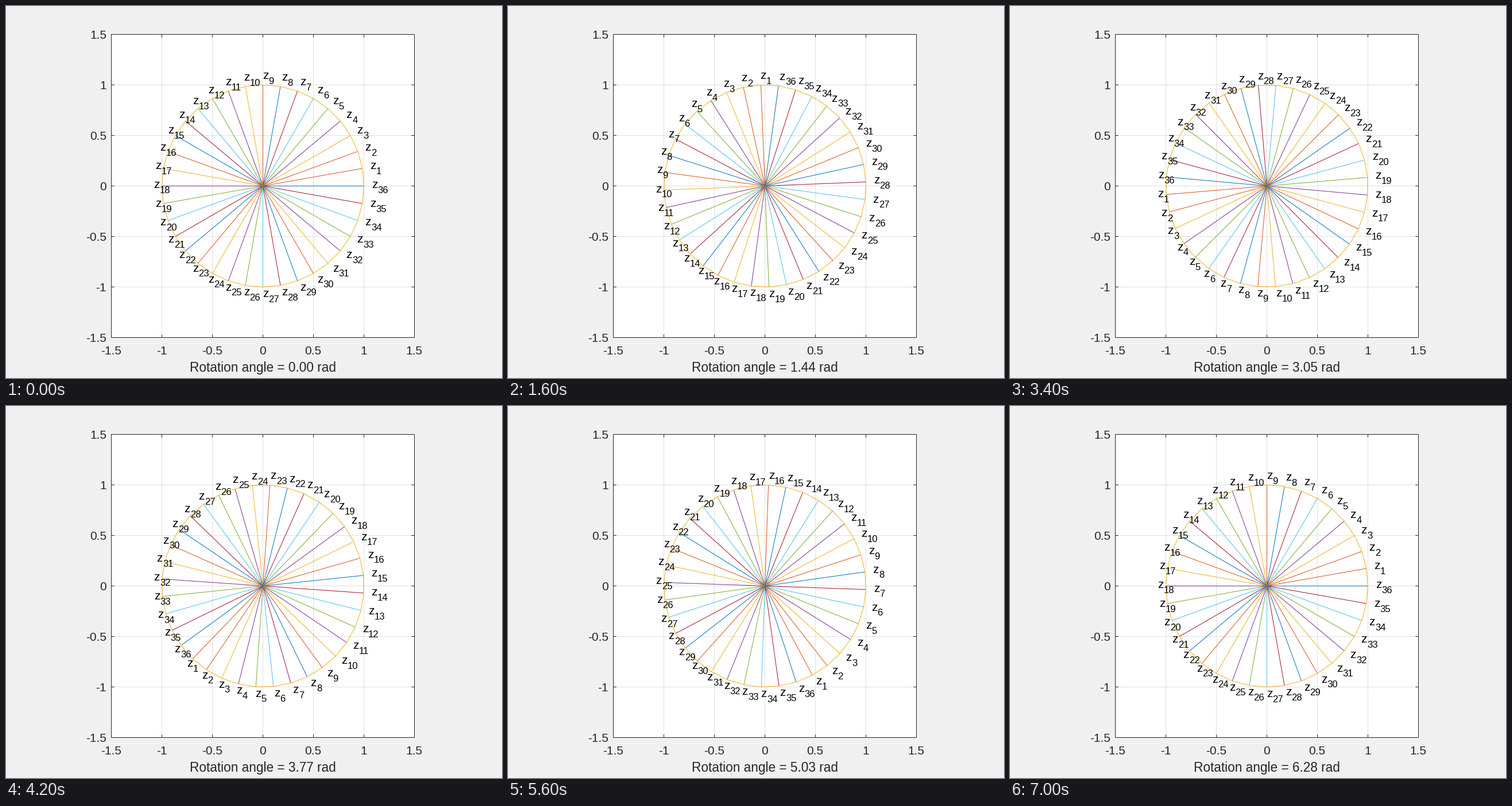
Animation, 864 px wide and 648 px high, one loop 7.2 s. Source, as a matplotlib script:

```python
import numpy as np
import matplotlib.pyplot as plt
from matplotlib.animation import FuncAnimation

W, H, DPI = 864, 648, 150
FRAMES, INTERVAL = 36, 200
CX, CY, UNIT = 447.5, 313.5, 176      # plot centre and pixels per data unit
HALF = 1.5 * UNIT
SPOKES = 36
LABEL_R = 1.08
PX = 72 / DPI                         # one pixel in points
TICK = 5.3
INK = "#262626"
COLORS = ["#0072BD", "#D95319", "#EDB120", "#7E2F8E",
          "#77AC30", "#4DBEEE", "#A2142F"]

plt.rcParams["font.family"] = "Liberation Sans"
fig = plt.figure(figsize=(W / DPI, H / DPI), dpi=DPI, facecolor="#F0F0F0")
ax = fig.add_axes([0, 0, 1, 1])
ax.set_xlim(0, W)
ax.set_ylim(H, 0)
ax.axis("off")


def line(xs, ys, color, z):
    # coordinates already sit on pixel centres, so snapping would shift them
    return ax.plot(xs, ys, color=color, lw=PX, zorder=z, snap=False,
                   solid_capstyle="butt", solid_joinstyle="miter")[0]


def label(x, y, text, size, color=INK, ha="left"):
    return ax.text(x, y, text, fontsize=size, color=color, ha=ha,
                   va="baseline", zorder=6)


def to_px(radius, angle):
    return CX + UNIT * radius * np.cos(angle), CY - UNIT * radius * np.sin(angle)


def draw_axes():
    left, right, top, bottom = CX - HALF, CX + HALF, CY - HALF, CY + HALF
    ax.fill([left, right, right, left], [top, top, bottom, bottom],
            color="white", lw=0, zorder=0)
    for value in np.arange(-1.5, 1.6, 0.5):
        x, y = CX + UNIT * value, CY - UNIT * value
        if abs(value) < 1.5:
            line([x, x], [top, bottom], "#DFDFDF", 1)
            line([left, right], [y, y], "#DFDFDF", 1)
            for start, step in ((top, TICK), (bottom, -TICK)):
                line([x, x], [start, start + step], INK, 4)
            for start, step in ((left, TICK), (right, -TICK)):
                line([start, start + step], [y, y], INK, 4)
        label(x - 0.5, 607, f"{value:g}", 10, ha="center")
        label(175, y + 7.5, f"{value:g}", 10, ha="right")
    line([left, right, right, left, left],
         [top, top, bottom, bottom, top], INK, 4)


draw_axes()
base = 2 * np.pi * np.arange(1, SPOKES + 1) / SPOKES
# the first spoke takes the second colour, the others follow the cycle
spokes = [line([], [], COLORS[k % 7 if k else 1], 2) for k in range(SPOKES)]
rim = line([], [], COLORS[2], 3)
names = [(label(0, 0, "z", 10, "black"), label(0, 0, str(k + 1), 8, "black"))
         for k in range(SPOKES)]
caption = label(CX - 0.5, 637, "", 10.85, ha="center")


def update(i):
    turn = 2 * np.pi * i / (FRAMES - 1)
    xs, ys = to_px(1, base + turn)
    tx, ty = to_px(LABEL_R, base + turn)
    for k in range(SPOKES):
        spokes[k].set_data([CX, xs[k]], [CY, ys[k]])
        letter, index = names[k]
        letter.set_position((tx[k] - 0.5, ty[k] + 3.5))
        index.set_position((tx[k] + 10.1, ty[k] + 12.3))
    rim.set_data(np.append(xs, xs[0]), np.append(ys, ys[0]))
    caption.set_text(f"Rotation angle = {turn:.2f} rad")
    return [*spokes, rim, caption]


anim = FuncAnimation(fig, update, frames=FRAMES, interval=INTERVAL,
                     repeat=True, repeat_delay=0, blit=False)
plt.show()
```
